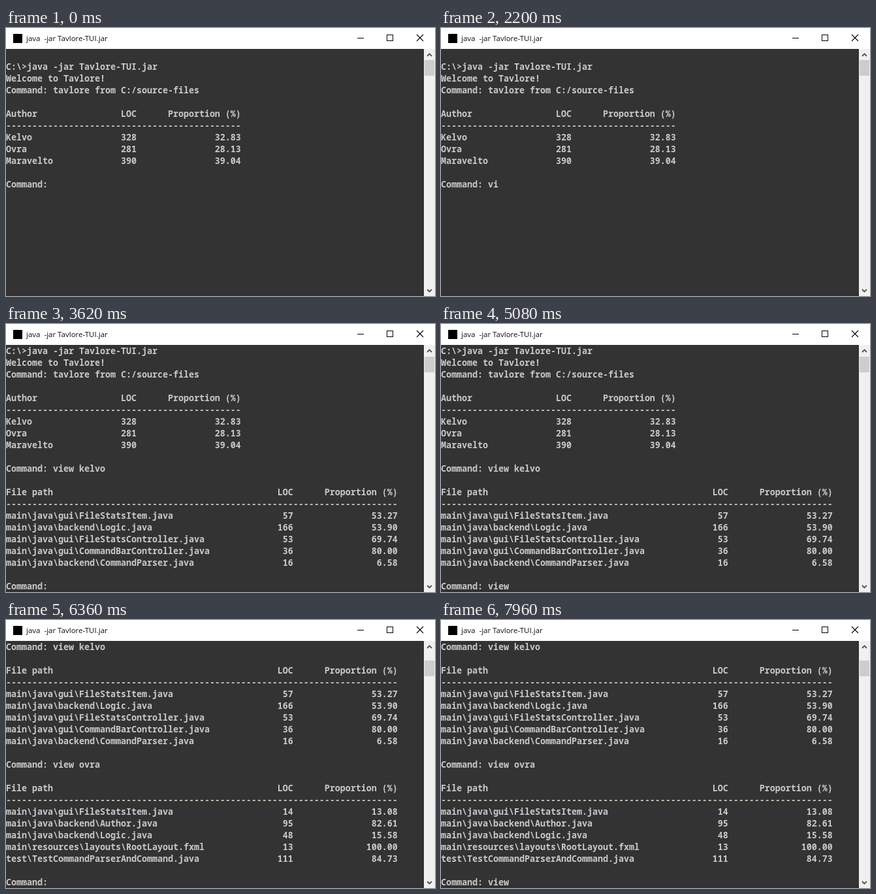
Animation, 657 px wide and 410 px high, one loop 8 s. Source, as an HTML page with a canvas:

```html
<!DOCTYPE html>
<html lang="en">
<head>
<meta charset="utf-8">
<title>Terminal</title>
<style>
  html, body { margin: 0; width: 100%; height: 100%; overflow: hidden; background: #333; }
  canvas, pre, #title { position: absolute; left: 0; top: 0; margin: 0; }
  #title {
    left: 31px; top: 0; line-height: 32px; white-space: pre; color: #111;
    font-family: "Open Sans", "Noto Sans", sans-serif; font-size: 11.5px;
  }
  pre {
    top: 32px; width: 640px; height: 378px; overflow: hidden; color: #c9c9c9;
    font: 600 13.3333px/18px "Noto Sans Mono", "DejaVu Sans Mono", monospace;
  }
  pre div { height: 18px; }
  .rule { color: #c9c8b6; }
</style>
</head>
<body>
<canvas id="stage" width="657" height="410"></canvas>
<div id="title">java  -jar Tavlore-TUI.jar</div>
<pre id="term"></pre>
<script>
const LOOP = 8000, ROW = 18, CELL = 8, TOP = 32;
const ctx = document.getElementById('stage').getContext('2d');
const term = document.getElementById('term');
const PROMPT = 'Command: ';

// A table: name column, then LOC and share aligned to their right edges.
function table(head, locEnd, rows) {
  const line = (a, b, c) => a + String(b).padStart(locEnd - a.length) + c.padStart(20);
  return ['', line(head, 'LOC', 'Proportion (%)'), '-'.repeat(locEnd + 20),
    ...rows.map(r => line(...r)), ''];
}

const intro = ['', 'C:\\>java -jar Tavlore-TUI.jar', 'Welcome to Tavlore!',
  PROMPT + 'tavlore from C:/source-files',
  ...table('Author', 25, [
    ['Kelvo', 328, '32.83'],
    ['Ovra', 281, '28.13'],
    ['Maravelto', 390, '39.04']
  ])];

const first = [...intro, PROMPT + 'view kelvo', ...table('File path', 55, [
  ['main\\java\\gui\\FileStatsItem.java', 57, '53.27'],
  ['main\\java\\backend\\Logic.java', 166, '53.90'],
  ['main\\java\\gui\\FileStatsController.java', 53, '69.74'],
  ['main\\java\\gui\\CommandBarController.java', 36, '80.00'],
  ['main\\java\\backend\\CommandParser.java', 16, '6.58']
])];

const second = [...first, PROMPT + 'view ovra', ...table('File path', 55, [
  ['main\\java\\gui\\FileStatsItem.java', 14, '13.08'],
  ['main\\java\\backend\\Author.java', 95, '82.61'],
  ['main\\java\\backend\\Logic.java', 48, '15.58'],
  ['main\\resources\\layouts\\RootLayout.fxml', 13, '100.00'],
  ['test\\TestCommandParserAndCommand.java', 111, '84.73']
])];

const screens = [
  { lines: intro, scroll: 0 },
  { lines: first, scroll: 1 },
  { lines: second, scroll: 11 }
];

// time, screen, typed text ("_" at the end shows the cursor)
const steps = [
  [0, 0, ''], [530, 0, '_'], [1040, 0, ''], [1590, 0, '_'],
  [2020, 0, 'v_'], [2090, 0, 'v'], [2200, 0, 'vi'], [2310, 0, 'vie'],
  [2420, 0, 'view'], [2570, 0, 'view _'],
  [2930, 0, 'view k_'], [3000, 0, 'view ke_'], [3080, 0, 'view ke'],
  [3150, 0, 'view kel'], [3230, 0, 'view kelv'], [3310, 0, 'view kelvo'],
  [3620, 1, ''], [4720, 1, 'v'], [4840, 1, 'vi'], [5020, 1, 'vie'], [5080, 1, 'view'],
  [5450, 1, 'view o_'], [5540, 1, 'view ov_'], [5630, 1, 'view ov'],
  [5720, 1, 'view ovr'], [5810, 1, 'view ovra'], [6250, 1, 'view ovra_'],
  [6360, 2, ''], [7290, 2, '_'], [7410, 2, 'v'], [7630, 2, 'vi'],
  [7710, 2, 'vie'], [7800, 2, 'view'], [7880, 2, 'view_'], [7960, 2, 'view']
];

function box(color, x, y, w, h) {
  ctx.fillStyle = color;
  ctx.fillRect(x, y, w, h);
}

function path(color, width, ...pts) {
  ctx.strokeStyle = color;
  ctx.lineWidth = width;
  ctx.beginPath();
  pts.forEach(([x, y]) => ctx.lineTo(x, y));
  ctx.stroke();
}

function drawTitleBar() {
  box('#fff', 0, 0, 657, TOP);
  box('#000', 11, 9, 14, 14);
  box('#000', 538, 15, 10, 1);
  ctx.strokeStyle = '#000';
  ctx.lineWidth = 1;
  ctx.strokeRect(583.5, 10.5, 9, 9);
  path('#000', 1.1, [629, 10], [639, 20]);
  path('#000', 1.1, [639, 10], [629, 20]);
}

function drawScrollBar(scroll) {
  box('#f0f0f0', 640, TOP, 17, 378);
  box('#cdcdcd', 641, Math.round(49 + scroll * 1.2), 15, 24);
  path('#505050', 1.8, [645, 43], [648.5, 39.5], [652, 43]);
  path('#505050', 1.8, [645, 400], [648.5, 403.5], [652, 400]);
}

function show([, index, input]) {
  const { lines, scroll } = screens[index];
  const cursor = input.endsWith('_');
  const typed = input.replace('_', '');
  const all = [...lines, PROMPT + typed].slice(scroll);

  term.replaceChildren(...all.map(text => {
    const row = document.createElement('div');
    row.textContent = text;
    if (text.startsWith('--')) row.className = 'rule';
    return row;
  }));

  box('#333', 0, TOP, 640, 378);
  box('#352e32', 0, 407, 640, 3);
  drawTitleBar();
  drawScrollBar(scroll);
  if (cursor) {
    const x = (PROMPT.length + typed.length) * CELL;
    box('#d0d0d0', x, TOP + all.length * ROW - 5, CELL, 5);
  }
}

let current;
const start = performance.now();
function tick() {
  const t = Math.max(0, performance.now() - start) % LOOP;
  const step = steps.findLast(s => s[0] <= t);
  if (step !== current) show(current = step);
  requestAnimationFrame(tick);
}
tick();
</script>
</body>
</html>
```
